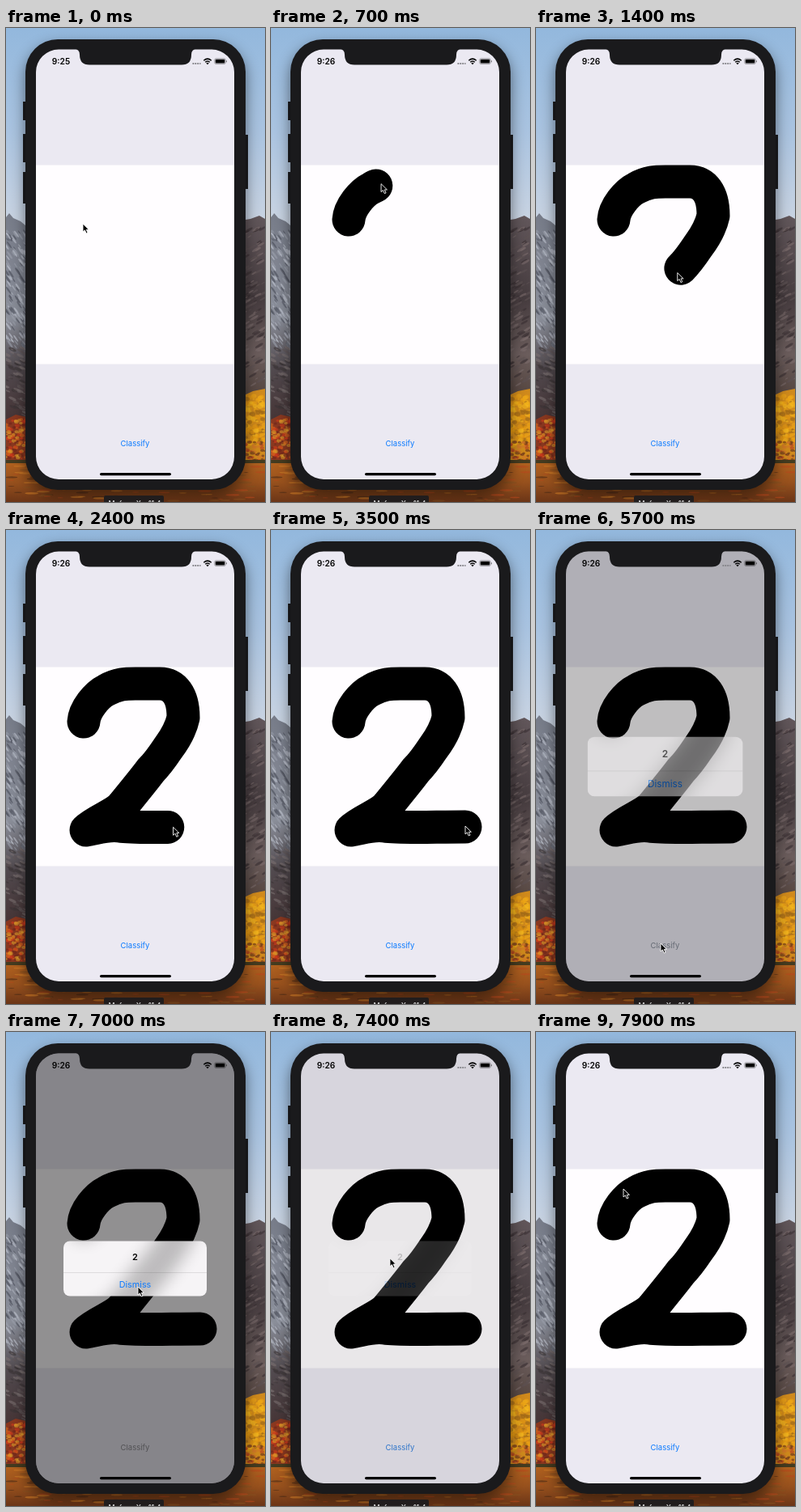
An HTML page that plays this animation: 320x586 px, repeating every 8000 ms.

```html
<!DOCTYPE html>
<html lang="en">
<head>
<meta charset="utf-8">
<title>Digit classifier</title>
<style>
html, body { margin: 0; height: 100%; overflow: hidden; }
svg { display: block; width: 100vw; height: 100vh; }
text { font-family: Inter, "Liberation Sans", sans-serif; text-anchor: middle; }
</style>
</head>
<body>
<svg viewBox="0 0 320 586">
  <defs>
    <linearGradient id="sky" x2="0" y2="1">
      <stop stop-color="#93b8dd"/><stop offset=".5" stop-color="#a9c3e0"/><stop offset="1" stop-color="#ccd5e2"/>
    </linearGradient>
    <linearGradient id="rockL" x2="0" y2="1">
      <stop stop-color="#777c89"/><stop offset=".5" stop-color="#8b8f9a"/><stop offset=".72" stop-color="#524b50"/><stop offset="1" stop-color="#453334"/>
    </linearGradient>
    <linearGradient id="rockR" x2="0" y2="1">
      <stop stop-color="#62575b"/><stop offset=".45" stop-color="#463c3f"/><stop offset=".75" stop-color="#6b5d5c"/><stop offset="1" stop-color="#53433d"/>
    </linearGradient>
    <linearGradient id="water" x2="0" y2="1">
      <stop stop-color="#b0611f"/><stop offset=".5" stop-color="#96501d"/><stop offset="1" stop-color="#6b3517"/>
    </linearGradient>
    <filter id="shade" x="-20%" y="-20%" width="140%" height="140%"><feGaussianBlur stdDeviation="9"/></filter>
    <filter id="frost" x="-20%" y="-20%" width="140%" height="140%"><feGaussianBlur stdDeviation="10"/></filter>
    <clipPath id="screen"><rect x="37" y="26.500" width="245" height="531.500" rx="28"/></clipPath>
    <clipPath id="panel"><rect x="71" y="258.500" width="177" height="68" rx="8"/></clipPath>
  </defs>

  <rect width="320" height="250" fill="url(#sky)"/>
  <path d="M0 234L4 229 9 235 18 239 30 249V490H0Z" fill="url(#rockL)"/>
  <path d="M290 238L302 236 313 232 320 236V460H290Z" fill="url(#rockR)"/>
  <path d="M0 484L12 478 30 482V540H0Z" fill="#8a3820"/>
  <path d="M290 456L305 449 320 446V540H290Z" fill="#d08a1c"/>
  <rect y="538" width="320" height="48" fill="url(#water)"/>
  <g id="texture"></g>
  <path d="M0 536H320" stroke="#453c20" stroke-width="4"/>

  <rect x="24" y="22" width="272" height="557" rx="40" opacity=".5" filter="url(#shade)"/>
  <path d="M21 91h6v23h-6zM21 131h6v35h-6zM21 178h6v39h-6zM293 132h6v67h-6z" fill="#151517"/>
  <rect x="24" y="14" width="272" height="557" rx="40" fill="#1a1a1c"/>

  <g clip-path="url(#screen)">
    <rect x="37" y="26" width="246" height="533" fill="#ebe9f2"/>
    <rect x="37" y="169.500" width="246" height="246" fill="#fffdff"/>
    <path id="ink" fill="none" stroke="#000" stroke-width="41" stroke-linecap="round" stroke-linejoin="round"/>
    <text id="button" x="159.500" y="517" font-size="9.500">Classify</text>
    <rect id="dim" x="37" y="26" width="246" height="533"/>
  </g>

  <path d="M84 25.500Q91 26 91 33Q91 45.500 103 45.500H217Q229 45.500 229 33Q229 26 236 25.500Z" fill="#1a1a1c"/>
  <text id="clock" x="68" y="45" font-size="10.200" font-weight="600"></text>
  <path d="M230.500 44h10" stroke="#85858a" stroke-width="1.800" stroke-dasharray="1.800 1.100"/>
  <path d="M244.300 40.200Q249 36 253.700 40.200M246.200 42.300Q249 39.700 251.800 42.300" fill="none" stroke="#000" stroke-width="1.500"/>
  <path d="M249 45.200l-1.700-1.800q1.700-1.300 3.400 0z"/>
  <rect x="257.700" y="37.800" width="13.600" height="6.700" rx="1.800" fill="none" stroke="#000" stroke-opacity=".45" stroke-width=".7"/>
  <rect x="258.700" y="38.800" width="11.600" height="4.700" rx="1"/>
  <path d="M272 40v2.400q1-.4 1-1.200t-1-1.200" opacity=".5"/>
  <rect x="116" y="550" width="88" height="3.200" rx="1.600"/>

  <g id="alert">
    <g clip-path="url(#panel)">
      <rect x="71" y="258" width="178" height="69" fill="#f6f4f6"/>
      <use href="#ink" filter="url(#frost)" opacity=".23"/>
    </g>
    <text x="159.500" y="282" font-size="11" font-weight="600">2</text>
    <path d="M71 297.500H248" stroke="#000" stroke-opacity=".14" stroke-width=".7"/>
    <text x="159.500" y="316.300" font-size="10.800" fill="#0a7aff">Dismiss</text>
  </g>

  <rect x="121" y="578" width="74" height="14" rx="2" fill="#211d1d"/>
  <text x="159" y="591" font-size="8.800" font-weight="500" fill="#ddd">Mofane X - 11.4</text>

  <path id="cursor" d="M0 0V10L2.400 7.900 4.200 12 6 11.200 4.300 7.300H7.400Z" stroke="#fff" stroke-width=".9"/>
</svg>
<script>
const $ = id => document.getElementById(id);
const ink = $('ink'), NS = 'http://www.w3.org/2000/svg';

// Seeded specks for rock, foliage and water
let seed = 7;
const rnd = () => (seed = seed * 16807 % 2147483647) / 2147483647;
function scatter(n, x, y, w, h, rx, ry, tilt, colors) {
  for (let i = 0; i < n; i++) {
    const e = document.createElementNS(NS, 'ellipse'), k = .5 + rnd();
    const at = `translate(${x + rnd() * w} ${y + rnd() * h}) rotate(${tilt})`;
    const a = { transform: at, rx: rx * k, ry: ry * k, opacity: .6, fill: colors[i % colors.length] };
    for (const key in a) e.setAttribute(key, a[key]);
    $('texture').append(e);
  }
}
scatter(150, 0, 250, 26, 145, 4, .9, 55, ['#c3c8d3', '#4a4d58', '#9da2ae']);
scatter(70, 0, 395, 26, 85, 3.5, 1.2, 25, ['#5f5557', '#3a3336', '#79706f']);
scatter(120, 294, 248, 28, 200, 4, 1.1, -30, ['#7b6d6d', '#382f32', '#5d5153']);
scatter(110, 0, 484, 26, 48, 2.2, 1.7, 0, ['#d23a1c', '#e0a02c', '#6f241a', '#dd6a1e']);
scatter(120, 294, 454, 28, 62, 2.5, 2, 0, ['#f6b91e', '#e89a10', '#f0a616', '#9a6418']);
scatter(50, 294, 512, 28, 24, 2.2, 1.5, 0, ['#b23a22', '#d2752a', '#5f2b1a']);
scatter(110, 0, 541, 320, 44, 6, .9, 0, ['#cf7c26', '#4a2a16', '#85501f', '#b8481c']);

// The digit in three parts; stroke lengths pace the drawing
const hook = 'M96 237C97 222 112 204 124 198C138 190 148 190 160 190H190C208 190 219 205 219 232C216 246 206 262 200 270C192 282 186 290 179 297';
const slant = hook + 'C170 309 156 326 143 342C134 352 110 360 99 371';
const digit = slant + 'C112 369 125 364 140 366C160 369 200 367 240 367';
const [hookLen, slantLen, total] = [hook, slant, digit].map(d => {
  ink.setAttribute('d', d);
  return ink.getTotalLength();
});
const START = 500, END = 2600;
const pace = [[START, 0], [1400, hookLen], [1900, slantLen], [END, total]];
const fade = [[5450, 0], [5900, 1], [7150, 1], [7500, 0]];
const before = [[0, 95, 242], [400, 96, 237]];
const after = [[3700, 240, 366], [4700, 154, 511], [6050, 154, 511], [6800, 163, 315], [7150, 163, 315], [7850, 108, 194]];

const ease = u => u * u * (3 - 2 * u);
const linear = u => u;
function track(keys, t, curve = ease, col = 1) {
  if (t <= keys[0][0]) return keys[0][col];
  const i = keys.findIndex(k => k[0] > t);
  if (i < 0) return keys.at(-1)[col];
  const a = keys[i - 1], b = keys[i];
  return a[col] + (b[col] - a[col]) * curve((t - a[0]) / (b[0] - a[0]));
}

function cursorAt(t, len) {
  if (t >= START && t < END) {
    const p = ink.getPointAtLength(Math.min(total, len + Math.min(7, len)));
    return [p.x, p.y];
  }
  const keys = t < START ? before : after;
  return [track(keys, t), track(keys, t, ease, 2)];
}

function frame() {
  const t = Math.floor(performance.now() % 8000 / 100) * 100;
  const len = track(pace, t, linear), f = track(fade, t);
  ink.style.visibility = t < START ? 'hidden' : 'visible';
  ink.style.strokeDasharray = `${len} 2000`;
  $('cursor').setAttribute('transform', `translate(${cursorAt(t, len)})`);
  $('clock').textContent = t < 600 ? '9:25' : '9:26';

  const gray = Math.min(1, f * 1.6);
  const tint = [[10, 142], [122, 142], [255, 147]].map(([a, b]) => a + (b - a) * gray);
  $('button').style.fill = `rgb(${tint})`;
  $('dim').style.opacity = .43 * f;
  $('alert').style.opacity = f;
  // Pops in from a larger size, but fades out in place
  const s = t < 6500 ? 1.2 - .2 * f : 1;
  $('alert').setAttribute('transform', `translate(159.5 292.5) scale(${s}) translate(-159.5 -292.5)`);
  requestAnimationFrame(frame);
}
frame();
</script>
</body>
</html>
```
